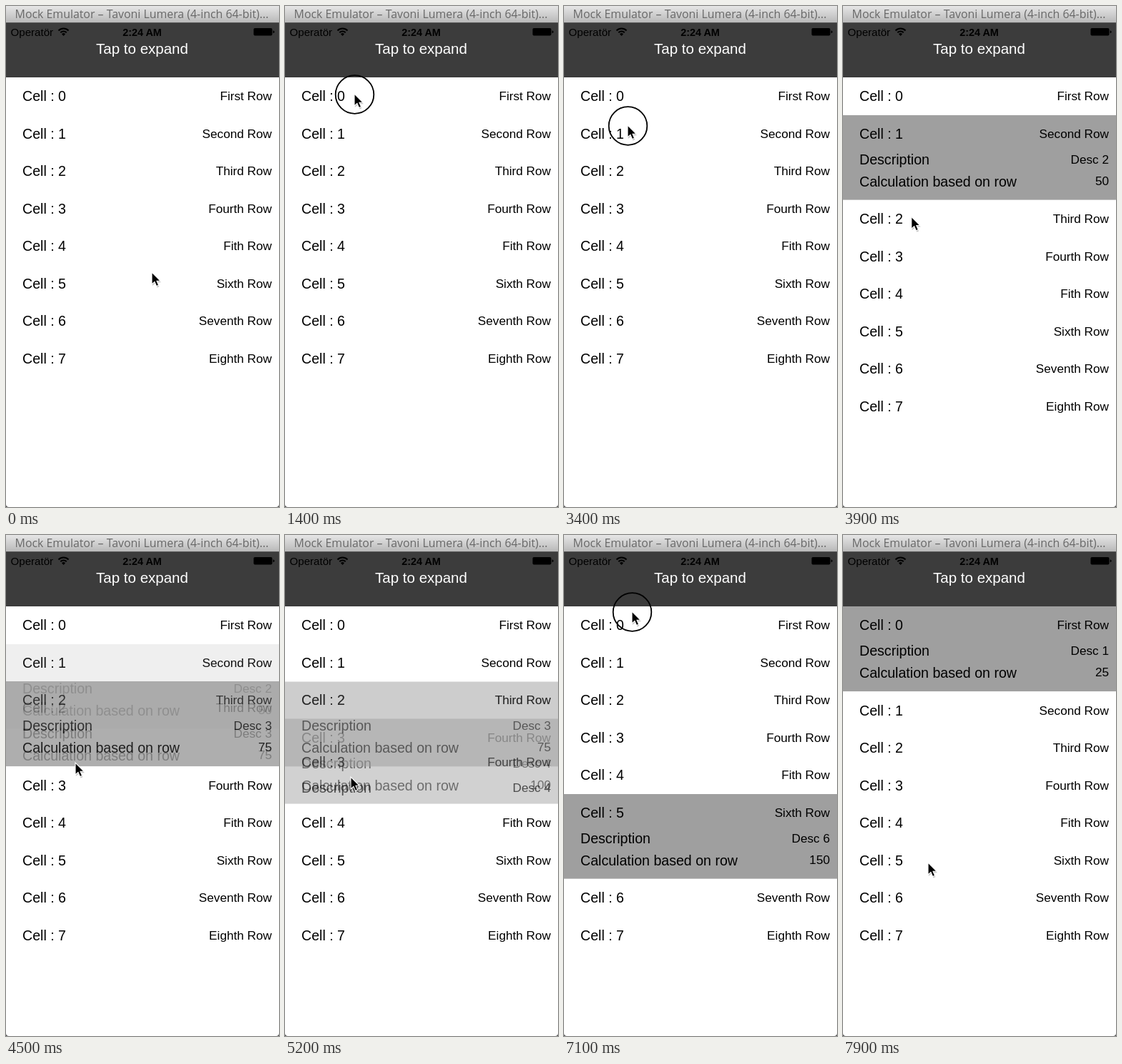
Recreate the animation shown at these times as an HTML page with a canvas. Size 382x702 px, loop 8000 ms.

```html
<!DOCTYPE html>
<html lang="en">
<head>
<meta charset="utf-8">
<title>Expandable cells</title>
<style>
  html, body { margin: 0; width: 100%; height: 100%; overflow: hidden; background: #444; }
  svg, canvas { position: absolute; left: 0; top: 0; width: 382px; height: 702px; }
  canvas { border-radius: 0 0 4px 4px; }
  text { font-family: "Liberation Sans", Arial, sans-serif; }
  .title { font: 15.9px "Open Sans", "Noto Sans", sans-serif; fill: #686868; text-anchor: middle; }
  .heading { font-size: 20.5px; fill: #fff; text-anchor: middle; }
  .carrier { font-size: 15.1px; }
  .clock { font-size: 14.4px; font-weight: bold; text-anchor: middle; }
</style>
</head>
<body>
<canvas id="list"></canvas>
<svg viewBox="0 0 382 702">
  <defs>
    <linearGradient id="bar" x2="0" y2="1">
      <stop stop-color="#e6e6e6"/><stop offset="1" stop-color="#b9b9b9"/>
    </linearGradient>
  </defs>
  <rect width="382" height="23" fill="url(#bar)"/>
  <rect y="23" width="382" height="77" fill="#3c3c3c"/>
  <rect y="23" width="382" height="1" fill="#555"/>
  <text class="title" x="190" y="17">Mock Emulator – Tavoni Lumera (4-inch 64-bit)...</text>
  <text class="carrier" x="6.5" y="42">Operatör</text>
  <g fill="none" stroke="#000" stroke-width="2">
    <path d="M73.5 34.5a9.8 9.8 0 0 1 14 0M76.3 37.3a5.8 5.8 0 0 1 8.4 0"/>
  </g>
  <path d="M78 39.2a3.4 3.4 0 0 1 5 0L80.5 42Z"/>
  <text class="clock" x="190.5" y="41.5">2:24 AM</text>
  <rect x="346.5" y="31" width="26" height="10.5" rx="1.8"/>
  <path d="M373.6 34.2q2 .4 2 2t-2 2Z"/>
  <text class="heading" x="190.5" y="67">Tap to expand</text>

  <circle id="ring" r="26.8" fill="none" stroke="#000" stroke-width="1.8"/>
  <g id="pointer">
    <path d="M0 0V17L3.9 13.4 6.6 19.6 9.6 18.3 7 12.3H12.2Z" transform="translate(.8 2)" opacity=".22"/>
    <path d="M0 0V17L3.9 13.4 6.6 19.6 9.6 18.3 7 12.3H12.2Z" stroke="#fff" stroke-width="1.1"/>
  </g>
</svg>
<script>
const WIDTH = 382, HEIGHT = 702, LOOP = 8000, STEP = 100;
const LIST_TOP = 100, ROW = 52.5, EXTRA = 66.8, FADE = 340;
const names = ['First', 'Second', 'Third', 'Fourth', 'Fith', 'Sixth', 'Seventh', 'Eighth'];
const NONE = -1;

// [start, row that closes, row that opens]
const switches = [
  [1540, NONE, 0], [2740, 0, NONE], [3540, NONE, 1], [4247, 1, 2],
  [5034, 2, 3], [5758, 3, 5], [7240, 5, 0]
];
// [time, x, y]
const path = [
  [0, 204, 373], [400, 204, 373], [1100, 115, 145], [1200, 115, 145], [1400, 97, 123],
  [2500, 97, 123], [2600, 96, 129], [2900, 96, 129], [3300, 89, 167], [3600, 89, 167],
  [4000, 97, 319], [4500, 97, 319], [4800, 92, 339], [5250, 92, 339], [5600, 91, 428],
  [6100, 91, 428], [7000, 95, 107], [7300, 95, 107], [7900, 119, 459], [LOOP, 119, 459]
];
const taps = [[1400, 1500], [2600, 2700], [3400, 3500], [4100, 4200], [4900, 5000], [5600, 5700], [7100, 7200]];

const canvas = document.getElementById('list');
const ring = document.getElementById('ring');
const pointer = document.getElementById('pointer');
const ctx = canvas.getContext('2d');
const scale = window.devicePixelRatio || 1;
canvas.width = WIDTH * scale;
canvas.height = HEIGHT * scale;
ctx.scale(scale, scale);

const clamp = x => Math.min(1, Math.max(0, x));
const ease = x => x * x * (3 - 2 * x);
const mix = (a, b, p) => a + (b - a) * p;
const topOf = (row, open) => LIST_TOP + row * ROW + (open !== NONE && row > open ? EXTRA : 0);

function fill(color, y, height, alpha = 1) {
  ctx.globalAlpha = alpha;
  ctx.fillStyle = color;
  ctx.fillRect(0, y, WIDTH, height);
}

function line(left, right, y, alpha, rise = .8) {
  ctx.globalAlpha = alpha;
  ctx.fillStyle = '#000';
  ctx.textAlign = 'left';
  ctx.font = '19.6px "Liberation Sans", Arial, sans-serif';
  ctx.fillText(left, 23, y);
  ctx.textAlign = 'right';
  ctx.font = '17.2px "Liberation Sans", Arial, sans-serif';
  ctx.fillText(right, 372, y - rise);
}

const heading = (row, y, alpha = 1) => line(`Cell : ${row}`, names[row] + ' Row', y + 33.2, alpha);

function details(row, y, alpha) {
  heading(row, y, alpha);
  line('Description', `Desc ${row + 1}`, y + 69, alpha);
  line('Calculation based on row', 25 * (row + 1), y + 100, alpha, 1.6);
}

function drawList(closing, opening, p) {
  const finalTop = row => topOf(row, opening);
  const movingTop = row => mix(topOf(row, closing), finalTop(row), p);
  const shifts = row => topOf(row, closing) !== finalTop(row);
  fill('#fff', LIST_TOP, HEIGHT - LIST_TOP);

  if (opening !== NONE) {
    if (!shifts(opening)) heading(opening, finalTop(opening));
    fill('#9f9f9f', finalTop(opening), ROW + EXTRA, p);
    details(opening, finalTop(opening), p);
  }
  if (closing !== NONE && p < 1) {
    heading(closing, finalTop(closing), shifts(closing) ? p : 1);
    fill('#9f9f9f', movingTop(closing), ROW + EXTRA, 1 - p);
    details(closing, movingTop(closing), 1 - p);
  } else if (closing !== NONE) {
    fill('#fff', finalTop(closing), ROW);
    heading(closing, finalTop(closing));
  }
  if (opening !== NONE && shifts(opening) && p < 1) {
    details(opening, movingTop(opening), (1 - p) ** .7);
  }
  // Untouched rows slide over the fading ones.
  names.forEach((_, row) => {
    if (row === closing || row === opening) return;
    fill('#fff', movingTop(row), row === names.length - 1 ? HEIGHT : ROW + .5);
    heading(row, movingTop(row));
  });
}

function pointerAt(t) {
  const i = path.findIndex(key => key[0] > t);
  const [t0, x0, y0] = path[i - 1], [t1, x1, y1] = path[i];
  const p = ease((t - t0) / (t1 - t0));
  return [mix(x0, x1, p), mix(y0, y1, p)];
}

function render(t) {
  const [start, closing, opening] = switches.filter(s => s[0] <= t).pop() || [0, NONE, NONE];
  drawList(closing, opening, ease(clamp((t - start) / FADE)));
  const [x, y] = pointerAt(t);
  pointer.setAttribute('transform', `translate(${x} ${y})`);
  ring.setAttribute('transform', `translate(${x + .5} ${y + 1})`);
  ring.style.display = taps.some(([from, to]) => t >= from && t <= to) ? '' : 'none';
}

const origin = performance.now();
function tick() {
  const t = (performance.now() - origin) % LOOP;
  render(Math.floor(t / STEP) * STEP);
  requestAnimationFrame(tick);
}
tick();
</script>
</body>
</html>
```
